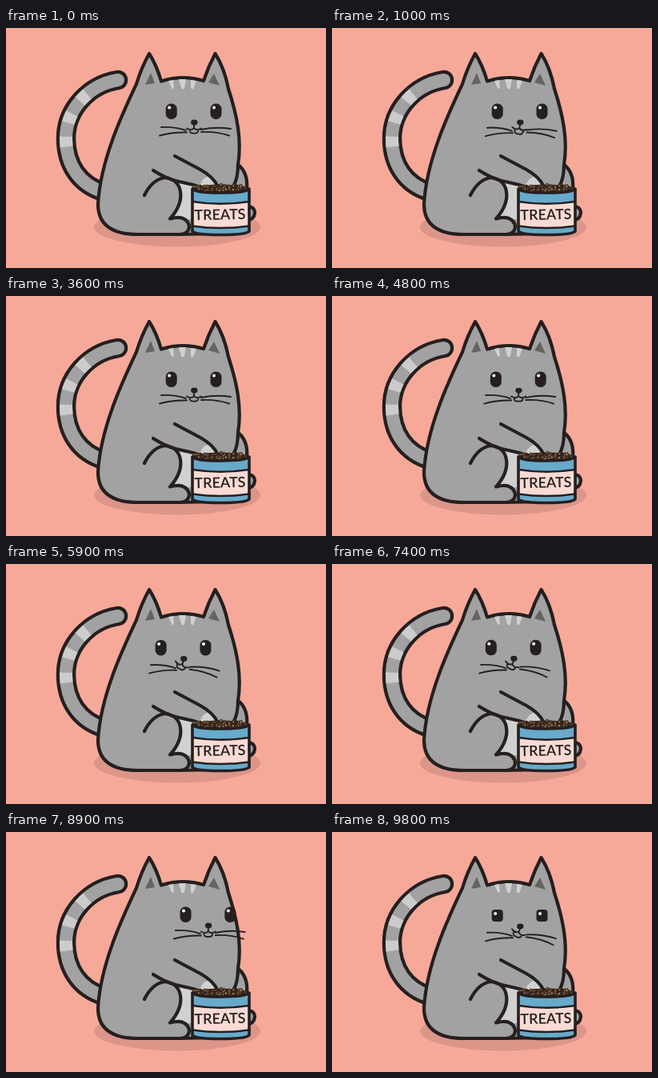
An HTML page that plays this animation: 400 by 300 pixels, repeating every 9.9 s.

```html
<!DOCTYPE html>
<html lang="en">
<head>
<meta charset="utf-8">
<title>Cat with treats</title>
<style>
html, body { margin: 0; width: 100%; height: 100%; overflow: hidden; background: #f7a999; }
svg { display: block; width: 100vw; height: 100vh; }
.ink { stroke: #251f1f; stroke-width: 4.2; stroke-linecap: round; stroke-linejoin: round; }
.thin { fill: none; stroke: #251f1f; stroke-width: 1.9; stroke-linecap: round; stroke-linejoin: round; }
.fur { fill: #a2a2a2; }
.pale { fill: #d0d1cf; }
.dark { fill: #251f1f; }
.none { fill: none; }
text { font: 600 18px Lato, sans-serif; fill: #251f1f; }
</style>
</head>
<body>
<svg viewBox="0 0 400 300">
  <defs>
    <path id="tail" pathLength="100" d="M140 65C103 71 75 102 75 138C75 171 92 196 122 205"/>
    <path id="leg" d="M173 209Q183 189 199 187C222 190 225 216 205 238.5Q214 236 220 237.5Q229 241 229 249Q228 257 218 258H165"/>
    <path id="arm" d="M211 160L243 177Q259 186 264 197Q266 206 256 205Q244 199 234 196L212 191"/>
    <path id="can" d="M233 201V254Q236 258.5 268 258.5Q301 258.5 304 254V201Q301 206 268 206Q236 206 233 201Z"/>
    <clipPath id="armClip"><use href="#arm"/></clipPath>
    <clipPath id="canClip"><use href="#can"/></clipPath>
  </defs>
  <rect width="400" height="300" fill="#f7a999"/>
  <ellipse cx="214" cy="249" rx="104" ry="24.5" fill="#dc9589"/>

  <g fill="none">
    <use href="#tail" stroke="#251f1f" stroke-width="24.5" stroke-linecap="round"/>
    <use href="#tail" stroke="#a2a2a2" stroke-width="16" stroke-linecap="round"/>
    <use href="#tail" stroke="#cbcccb" stroke-width="16" stroke-dasharray="0 22 6.5 9.5 6.5 9 6.5 100"/>
  </g>

  <path class="ink fur" d="M303 223Q311 224 311 231Q310 239 303 240"/>
  <path class="ink fur" d="M289 170Q303 180 301 202L284 208Z"/>
  <path class="ink fur" d="M163 70Q169 50 179 32Q188 46 194 66.5Q221 58 247 66Q253 48 261.5 32Q273 50 278 76C289 110 295 140 290 171Q290 188 284 198L270 257L212 258H165C132 258 115 246 115 220C118 165 146 106 163 70Z"/>
  <path d="M181 56L174 71L186 69ZM260 57L253 68L267 72Z" fill="#666363"/>
  <path class="pale" d="M203 66L209 65L210 75Q208 77 207 75ZM216 64H225L223 75Q221 78 219 75ZM231 65L238 66L234 76Q232 77 231 75Z"/>

  <path class="pale" d="M213 192Q228 194 238 198V239H206Q224 216 213 192Z"/>
  <g id="face">
    <g id="eyes"></g>
    <ellipse class="dark" cx="235.3" cy="118" rx="4.2" ry="3.4"/>
    <path id="left" class="thin" d="M194 124Q210 123 225 128M192 134.5Q208 130 226 130.5"/>
    <path id="right" class="thin" d="M244 127Q262 123 281 126M244 130Q263 129 279 134.5"/>
    <path id="mouth" class="thin"/>
  </g>

  <use href="#leg" class="fur"/>
  <use href="#leg" class="ink none"/>
  <path class="ink none" d="M184 178Q198 187 212 191"/>
  <g id="paw">
    <use href="#arm" class="fur"/>
    <circle class="pale" cx="257" cy="200" r="15" clip-path="url(#armClip)"/>
    <use href="#arm" class="ink none"/>
  </g>

  <path d="M233 203Q234 197 245 197Q268 194 292 197Q303 198 304 203Q301 208 268 208Q235 208 233 203Z" fill="#33241d"/>
  <g id="kibble" stroke="#33241d" stroke-width=".8"></g>
  <g clip-path="url(#canClip)">
    <rect x="230" y="198" width="80" height="64" fill="#67aaca"/>
    <path class="ink" style="stroke-width:2.6" d="M230 216.5Q268 223 307 216.5V247Q268 253 230 247Z" fill="#fadad4"/>
  </g>
  <use href="#can" class="ink none" style="stroke-width:3.6"/>
  <text x="267.5" y="239.5" text-anchor="middle" transform="rotate(-1.5 267.5 234)">TREATS</text>
</svg>
<script>
const LOOP = 9900, STEP = 100, CHEW = 600;
const $ = id => document.getElementById(id);
const move = (id, value) => $(id).setAttribute("transform", value);

// Piecewise cosine easing through [time, value] stops.
function along(stops, t) {
  for (let i = 1; i < stops.length; i++) {
    const [t0, a] = stops[i - 1], [t1, b] = stops[i];
    if (t <= t1) {
      const p = Math.max(0, (t - t0) / (t1 - t0));
      return a + (b - a) * (1 - Math.cos(Math.PI * p)) / 2;
    }
  }
  return stops[stops.length - 1][1];
}

const look = [[4300, 0], [6650, -17], [8850, 18], [9650, 0]];
const reach = [[1400, 0], [1800, -69], [1900, -69], [2100, -13], [2300, 0]];
const blinks = [700, 9700];

function eye(x, lid) {
  const h = [19.5, 15, 3][lid], y = [94.5, 97, 105][lid];
  const glint = lid < 2 ? `<circle cx="${x - 2.5}" cy="${y + 5}" r="2" fill="#fff"/>` : "";
  return `<rect class="dark" x="${x - 7}" y="${y}" width="14" height="${h}" rx="${[6.6, 4, 1.5][lid]}"/>` + glint;
}

// Each chew rests for one step, then swings the jaw sideways twice.
function chew(t, dx) {
  const u = Math.max(0, t % CHEW - STEP) / (CHEW - STEP) * 2 * Math.PI;
  const tilt = (1 - Math.cos(2 * u)) / 2 * (1 - Math.max(0, dx) / 18);
  const drop = 132 - Math.cos(u) * .6;
  move("left", `translate(0 ${tilt * 2})`);
  move("right", `rotate(${tilt * 10} 235 122)`);
  move("mouth", `rotate(${tilt * 28} 235 121)`);
  $("mouth").setAttribute("d", "M235 120V125Q232 129 226 125.5M235 125Q238 129 244 125.5" +
    `M229.5 128Q230 ${drop + 1} 235 ${drop}Q240 ${drop + 1} 240.5 128`);
}

function fillCan() {
  let seed = 11, out = "";
  const rnd = () => (seed = seed * 16807 % 2147483647) / 2147483647;
  const tones = ["#8f6847", "#ad8661", "#77553c", "#33241d"];
  for (let i = 0; i < 110; i++) {
    const x = 235 + rnd() * 67, edge = Math.abs(x - 268) / 34;
    const y = 196 + edge * 2 + rnd() * (11 - edge * 4);
    out += `<ellipse cx="${x}" cy="${y}" rx="2" ry="1.4" fill="${tones[i % 4]}" transform="rotate(${rnd() * 180} ${x} ${y})"/>`;
  }
  $("kibble").innerHTML = out;
}

function draw(t) {
  const dx = along(look, t);
  move("face", `translate(${dx} ${dx > 0 ? -dx / 18 : -dx / 34})`);
  const gap = Math.min(...blinks.map(b => Math.abs(t - b)));
  const lid = gap < 50 ? 2 : gap < 150 ? 1 : 0;
  $("eyes").innerHTML = eye(206.7, lid) + eye(262.5, lid);
  chew(t, dx);
  move("paw", `rotate(${along(reach, t)} 205 178)`);
}

function tick() {
  draw(Math.floor(performance.now() % LOOP / STEP) * STEP);
  requestAnimationFrame(tick);
}

fillCan();
tick();
</script>
</body>
</html>
```
